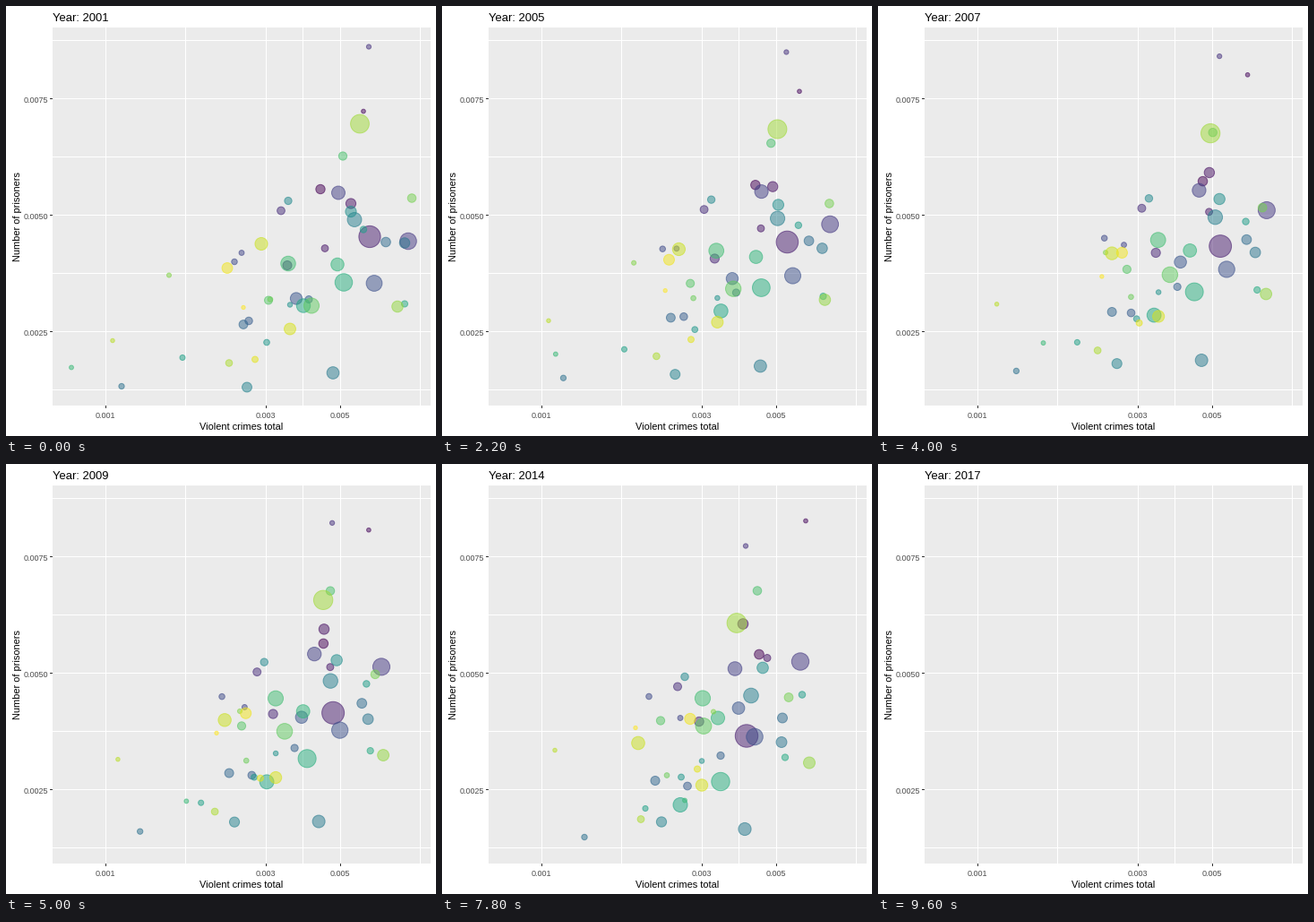
A matplotlib script that plays this animation: 480x480 px, repeating every 10 s.

```python
import numpy as np
import matplotlib.pyplot as plt
from matplotlib.animation import FuncAnimation
from matplotlib.patches import Rectangle

FRAMES, SIDE = 100, 480
FIRST_YEAR, LAST_YEAR = 2001, 2017
DRIFT_END, LAST_DATA_FRAME = 78, 93
PANEL = (52, 24, 474, 446)
GREY = "#4D4D4D"

# Alphabetical by full name: sets the colour and the stacking.
STATES = """AL AK AZ AR CA CO CT DE FL GA HI ID IL IN IA KS KY LA ME MD MA MI MN MS MO
MT NE NV NH NJ NM NY NC ND OH OK OR PA RI SC SD TN TX UT VT VA WA WV WI WY""".split()

# Most populous first: sets the bubble size.
BY_POPULATION = """CA TX NY FL IL PA OH MI NJ GA NC VA MA IN WA TN MO WI MD AZ MN LA AL CO
KY SC OK OR CT IA MS KS AR UT NV NM WV NE ID ME NH HI RI MT DE SD ND AK VT WY""".split()

# Shared drift in pixels -> starting points of the states that follow it.
TRENDS = {
    (-66, 46): dict(CA=(406, 258), MD=(445, 265), SC=(453, 215), TX=(395, 132),
                    NJ=(332, 335), VA=(285, 266), NY=(377, 309), DE=(405, 46)),
    (-44, 20): dict(CT=(307, 229), LA=(424, 264), MI=(389, 239), MS=(315, 218),
                    GA=(371, 209), RI=(295, 328)),
    (-49, -42): dict(FL=(449, 263), AZ=(385, 221), WY=(265, 337), PA=(341, 335),
                     OR=(293, 329)),
    (-62, -5): dict(IL=(411, 310), NC=(370, 289), NM=(445, 333)),
    (-24, -26): dict(OH=(315, 288), OK=(376, 168), ID=(255, 286), MN=(269, 426),
                     NE=(291, 376)),
    (-27, -2): dict(KS=(338, 328), KY=(265, 356), MO=(385, 230), TN=(437, 336),
                    WA=(317, 361), MA=(365, 410), CO=(314, 290), MT=(317, 334),
                    UT=(249, 399)),
    (3, 8): dict(AL=(351, 205), HI=(263, 276), NV=(399, 250), IA=(271, 352)),
    (7, -54): dict(AK=(399, 118), AR=(356, 271), VT=(119, 374), WV=(278, 395),
                   IN=(324, 327)),
    (30, -8): dict(ME=(129, 425), NH=(197, 393), WI=(247, 293)),
    (121, -24): dict(SD=(182, 301)),
    (198, -28): dict(ND=(73, 404)),
}
start_of = {name: xy for group in TRENDS.values() for name, xy in group.items()}
drift_of = {name: drift for drift, group in TRENDS.items() for name in group}
starts = np.array([start_of[name] for name in STATES]) - (0, .5)
drifts = np.array([drift_of[name] for name in STATES])
ranks = np.array([BY_POPULATION.index(name) for name in STATES]) / (len(STATES) - 1)

# Nationwide swing around the steady drifts.
SWING_FRAMES = (0, 9, 22, 40, 61, 78, 93)
SWING_X = (0, -3, -2, 10, -8, 0, 10)
SWING_Y = (0, -6, -7, -13, -5, 0, 4)


def positions(frame):
    swing = [np.interp(frame, SWING_FRAMES, path) for path in (SWING_X, SWING_Y)]
    return starts + drifts * min(frame / DRIFT_END, 1) + swing


def marker_areas(frame):
    """Bubbles shrink with population rank and grow slightly over time."""
    growth = 0.936 + 0.064 * frame / LAST_DATA_FRAME
    size = 2 + 10 * growth * (1 - ranks ** 0.45)
    radius = 0.375 * size * 72.27 / 25.4
    return (2 * radius) ** 2


fig = plt.figure(figsize=(SIDE / 72, SIDE / 72), dpi=72, facecolor="white")
ax = fig.add_axes((0, 0, 1, 1), xlim=(0, SIDE), ylim=(SIDE, 0))
ax.axis("off")

left, top, right, bottom = PANEL
ax.add_patch(Rectangle((left, top), right - left, bottom - top, fc="#EBEBEB", lw=0))


def line(xs, ys, color):
    ax.plot(xs, ys, color=color, lw=1, solid_capstyle="butt", snap=False, zorder=1)


def label(x, y, text, size, color="black", **kwargs):
    return ax.text(x, y, text, fontsize=size, color=color, va="baseline",
                   family="Liberation Sans", **kwargs)


for x in (111.5, 200.5, 290.5, 331.5, 373.5, 462.5):
    line((x, x), (top, bottom), "white")
for i in range(7):
    line((left, right), (38.5 + 65 * i,) * 2, "white")

for x, text in ((111.5, "0.001"), (290.5, "0.003"), (373.5, "0.005")):
    line((x, x), (bottom, bottom + 3), "#333333")
    label(x - 1, 460, text, 9, GREY, ha="center")
for y, text in ((103.5, "0.0075"), (233.5, "0.0050"), (363.5, "0.0025")):
    line((left - 3, left), (y, y), "#333333")
    label(47, y + 4, text, 9, GREY, ha="right")

label(263, 473, "Violent crimes total", 11, ha="center")
label(16, 235, "Number of prisoners", 11, ha="center", rotation=90, rotation_mode="anchor")
title = label(52, 17, "", 13)

rgb = plt.get_cmap("viridis")(np.linspace(0, 1, len(STATES)))[:, :3]
fills, rims = (np.column_stack((rgb, np.full(len(rgb), a))) for a in (.5, .6))
dots = ax.scatter(*starts.T, s=marker_areas(0), facecolors=fills, edgecolors=rims,
                  linewidths=1, zorder=3)


def draw(frame):
    elapsed = frame * (LAST_YEAR - FIRST_YEAR) / (FRAMES - 1)
    title.set_text(f"Year: {FIRST_YEAR + round(elapsed)}")
    dots.set_visible(frame <= LAST_DATA_FRAME)
    dots.set_offsets(positions(frame))
    dots.set_sizes(marker_areas(frame))
    return dots, title


anim = FuncAnimation(fig, draw, frames=FRAMES, interval=100, repeat=True, repeat_delay=0)
plt.show()
```
